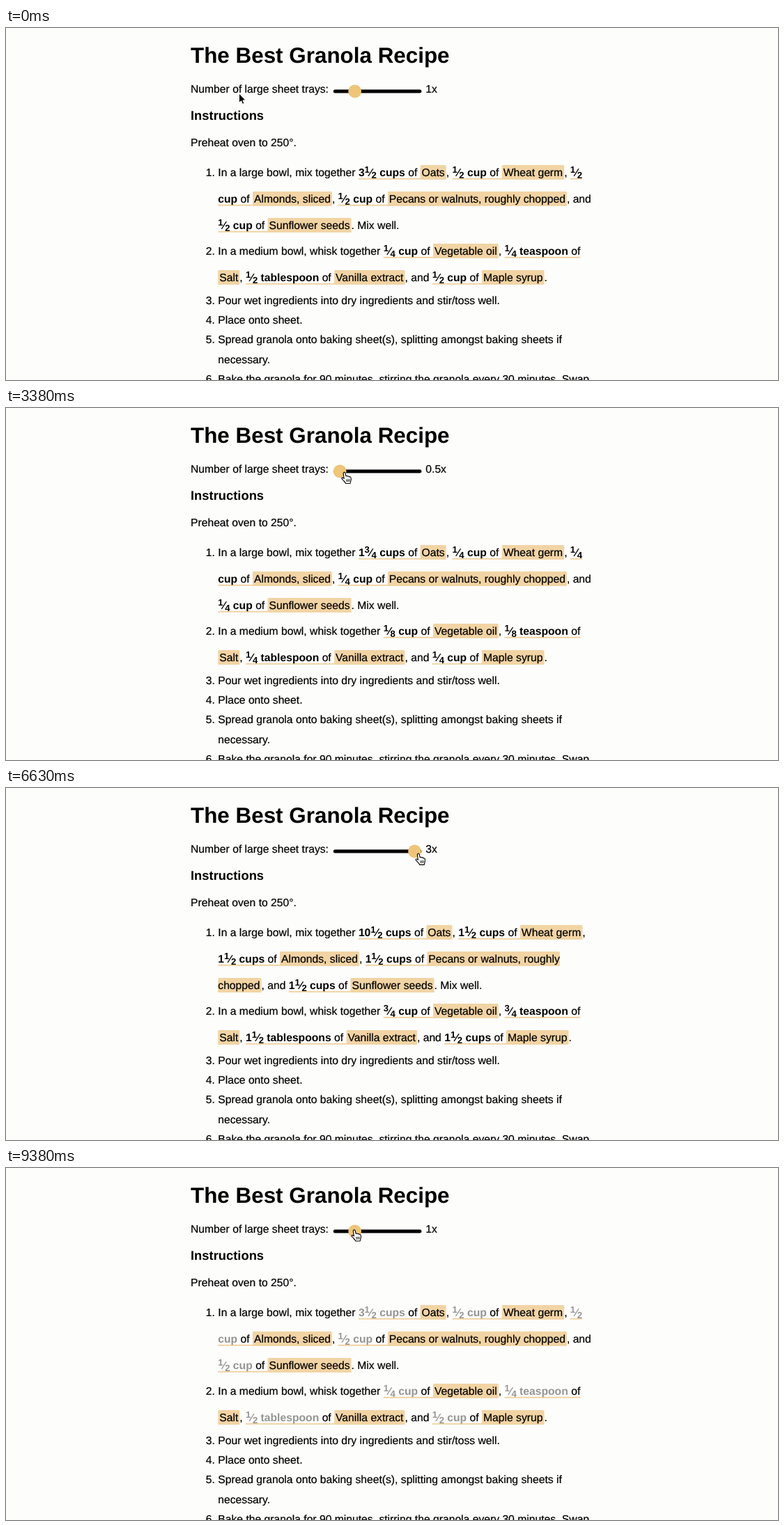
Animation of 1108x506 px, one loop 9.51 s. Source, as an HTML page:

```html
<!DOCTYPE html>
<html lang="en">
<head>
<meta charset="utf-8">
<title>Granola recipe</title>
<style>
  html, body { margin: 0; width: 100%; height: 100%; overflow: hidden; background: #fdfdfc; }
  svg { display: block; width: 1108px; height: 506px; }
  text { font: 15.7px "Liberation Sans", Arial, sans-serif; text-rendering: geometricPrecision; white-space: pre;
    stroke: #000; stroke-width: .22px; }
  .bold { font-weight: bold; stroke: none; }
  .h1 { font-size: 31.4px; }
  .h3 { font-size: 18.37px; }
  .small { font-size: 13.1px; }
  .mark { fill: #f2d4a4; }
  .num { text-anchor: end; }
</style>
</head>
<body>
<svg viewBox="0 0 1108 506" xmlns="http://www.w3.org/2000/svg">
  <text class="bold h1" x="265" y="50">The Best Granola Recipe</text>
  <text x="265" y="93">Number of large sheet trays:</text>
  <rect x="469.8" y="88.5" width="126.6" height="5" rx="2.5"/>
  <circle id="thumb" cy="91" r="9.4" fill="#efc578"/>
  <text id="scale" x="602.3" y="93"></text>
  <text class="bold h3" x="265" y="132">Instructions</text>
  <text x="265" y="170">Preheat oven to 250°.</text>
  <g id="steps"></g>
  <g id="recipe"></g>
  <g id="cursor">
    <path id="arrow" d="M0 0V13.5L3.1 10.7 5.1 15.4 7.4 14.4 5.4 9.9H9.6Z" stroke="#fff" stroke-linejoin="round"/>
    <g id="hand" fill="#fff" stroke="#000" stroke-width="1.1" stroke-linejoin="round" stroke-linecap="round">
      <path d="M-1.7 1.4Q-1.2-.4.3 0Q1.2.4 1.4 2L2.2 5.4Q3.6 4.4 4.6 5.8Q6 5 7 6.6Q8.6 6 9.2 7.6Q9.8 10 9 12.4L8.2 16H1.8Q.4 13.6-1.2 12L-3.6 9.4Q-4.4 8-3.2 7.6Q-2 7.4-.6 9Z"/>
      <path d="M2.8 10.4l.4 3M4.8 10.2l.3 3M6.8 10l.2 3" stroke-width=".9"/>
    </g>
  </g>
</svg>
<script>
const LOOP = 9510, STEP = 125, GRAB = 1250;
const EM = 15.7, LEFT = 304.3, RIGHT = 857, PAD = 1.96;
const MIX_LEADING = 37.7, LEADING = 1.8 * EM;
const MIX_TOP = 213.3, PLAIN_TOP = 396.8, MIX_LINES = 3;
const THUMB_MIN = 479.2, THUMB_UNIT = 42.9;
const $ = id => document.getElementById(id);

// Ingredients are {eighths unit name} at 1x.
const mixes = [
  "In a large bowl, mix together {28 cup Oats}, {4 cup Wheat germ}, {4 cup Almonds, sliced}, " +
    "{4 cup Pecans or walnuts, roughly chopped}, and {4 cup Sunflower seeds}. Mix well.",
  "In a medium bowl, whisk together {2 cup Vegetable oil}, {2 teaspoon Salt}, " +
    "{4 tablespoon Vanilla extract}, and {4 cup Maple syrup}."
];
const plain = [
  "Pour wet ingredients into dry ingredients and stir/toss well.",
  "Place onto sheet.",
  "Spread granola onto baking sheet(s), splitting amongst baking sheets if\nnecessary.",
  "Bake the granola for 90 minutes, stirring the granola every 30 minutes. Swap"
];
const mixTop = i => MIX_TOP + i * MIX_LINES * MIX_LEADING;

// Turning points of the pointer tip: time, x, y
const stops = [
  [250, 334.5, 94], [1000, 500, 92], [1375, 500, 92], [2000, 478, 92.5], [3000, 478, 92.5],
  [4500, 528, 92.5], [5625, 567, 92.5], [6000, 567, 94], [6500, 592, 94.5], [7000, 592, 94],
  [8500, 520, 89], [8875, 540, 89], [9450, 498, 89]
];

function pointerAt(t) {
  const i = stops.findIndex(s => s[0] > t);
  if (i <= 0) return stops.at(i).slice(1);
  const [t0, x0, y0] = stops[i - 1], [t1, x1, y1] = stops[i];
  const u = (t - t0) / (t1 - t0), p = u * u * (3 - 2 * u);
  return [x0 + (x1 - x0) * p, y0 + (y1 - y0) * p];
}

// The slider follows the pointer in half steps once it is held.
function scaleAt(t) {
  if (t < GRAB) return 1;
  const halves = Math.round((pointerAt(t)[0] - THUMB_MIN) / THUMB_UNIT * 2);
  return 0.5 + Math.min(5, Math.max(0, halves)) / 2;
}

// New amounts fade in over a few ticks.
function fadeAt(t) {
  let age = 0;
  while (age < 3 && scaleAt(t - (age + 1) * STEP) === scaleAt(t)) age++;
  return Math.min(1, 0.1 + 0.31 * age);
}

const pen = document.createElement("canvas").getContext("2d");
const widths = {};
function measure(str, bold, size = EM) {
  const key = str + bold;
  if (!(key in widths)) {
    pen.font = (bold ? "bold " : "") + '1000px "Liberation Sans", Arial, sans-serif';
    widths[key] = pen.measureText(str).width / 1000;
  }
  return widths[key] * size;
}

const textTag = (str, x, y, cls = "", alpha = 1) =>
  `<text x="${x.toFixed(2)}" y="${y.toFixed(2)}" class="${cls}" opacity="${alpha}">${str}</text>`;

const rectTag = (x0, x1, y, h, r) =>
  `<rect class="mark" x="${x0.toFixed(2)}" y="${y.toFixed(2)}" width="${(x1 - x0).toFixed(2)}" height="${h}" rx="${r}"/>`;

function fraction(eighths) {
  let n = eighths % 8, d = 8;
  while (n && n % 2 === 0) { n /= 2; d /= 2; }
  return { whole: Math.floor(eighths / 8), n, d };
}

// Splits a sentence into words; each word is a list of styled pieces.
function toWords(sentence, scale) {
  const words = [[]];
  const push = piece => words.at(-1).push(piece);
  const add = (str, style) => str.split(/( )/).forEach(s => {
    const piece = { ...style, str: s, w: measure(s, style.bold) };
    if (s === " ") words.push([{ ...piece, space: true }], []);
    else if (s) push(piece);
  });

  sentence.split(/[{}]/).forEach((part, i) => {
    if (i % 2 === 0) return add(part, {});
    const [, base, unit, name] = part.match(/^(\d+) (\w+) (.+)$/);
    const amount = base * scale, f = fraction(amount);
    const qty = { id: i, bold: true, fade: true }, hi = { id: i, hi: true };
    if (f.whole) add(String(f.whole), qty);
    if (f.n) {
      const digits = [measure(f.n, true, 13.1), measure("\u2044", true), measure(f.d, true, 13.1)];
      push({ ...qty, frac: f, digits, w: digits[0] + digits[1] + digits[2] });
    }
    add(" " + unit + (amount > 8 ? "s" : ""), qty);
    add(" of ", { id: i });
    push({ ...hi, str: "", w: PAD });
    add(name, hi);
    push({ ...hi, str: "", w: PAD });
  });
  return words;
}

function drawPiece(p, x, y, alpha) {
  const a = p.fade ? alpha : 1;
  if (p.frac) {
    const [w1, w2] = p.digits;
    return textTag(p.frac.n, x, y - 5, "bold small", a) +
      textTag("\u2044", x + w1, y, "bold", a) +
      textTag(p.frac.d, x + w1 + w2, y + 3, "bold small", a);
  }
  return p.str && !p.space ? textTag(p.str, x, y, p.bold ? "bold" : "", a) : "";
}

function drawMix(sentence, top, scale, alpha) {
  let x = LEFT, line = 0, text = "", gap = [];
  const spans = {};
  const place = p => {
    const y = Math.round(top + line * MIX_LEADING);
    if (p.id) {
      for (const kind of p.hi ? ["line", "box"] : ["line"]) {
        const key = kind + p.id + "@" + y;
        spans[key] = spans[key] || { kind, y, x0: x };
        spans[key].x1 = x + p.w;
      }
    }
    text += drawPiece(p, x, y, alpha);
    x += p.w;
  };
  for (const word of toWords(sentence, scale)) {
    if (!word.length) continue;
    if (word[0].space) { gap = word; continue; }
    const total = gap.concat(word).reduce((sum, p) => sum + p.w, 0);
    if (x + total > RIGHT) { x = LEFT; line++; }
    else gap.forEach(place);
    gap = [];
    word.forEach(place);
  }
  const marks = Object.values(spans).map(s => s.kind === "box"
    ? rectTag(s.x0, s.x1, s.y - 16, 20.8, 1.5)
    : rectTag(s.x0, s.x1, s.y + 2.8, 2, 0));
  return marks.join("") + text;
}

function drawSteps() {
  const number = (n, y) => textTag(n + ".", 299.8, Math.round(y), "num");
  let html = mixes.map((_, i) => number(i + 1, mixTop(i))).join("");
  let y = PLAIN_TOP;
  plain.forEach((item, i) => {
    html += number(mixes.length + i + 1, y);
    for (const row of item.split("\n")) {
      html += textTag(row, LEFT, Math.round(y));
      y += LEADING;
    }
  });
  $("steps").innerHTML = html;
}

let shown = -1;
function draw(time) {
  const t = Math.min(Math.floor((time % LOOP) / STEP) * STEP, 9375);
  if (t === shown) return;
  shown = t;
  const scale = scaleAt(t), alpha = fadeAt(t), [x, y] = pointerAt(t);
  const over = x > 468;
  $("recipe").innerHTML = mixes.map((s, i) => drawMix(s, mixTop(i), scale, alpha)).join("");
  $("scale").textContent = scale + "x";
  $("thumb").setAttribute("cx", THUMB_MIN + (scale - 0.5) * THUMB_UNIT);
  $("cursor").setAttribute("transform", `translate(${x.toFixed(1)} ${y.toFixed(1)})`);
  $("arrow").setAttribute("display", over ? "none" : "inline");
  $("hand").setAttribute("display", over ? "inline" : "none");
}

drawSteps();
const start = performance.now();
function tick() {
  draw(performance.now() - start);
  requestAnimationFrame(tick);
}
tick();
</script>
</body>
</html>
```
